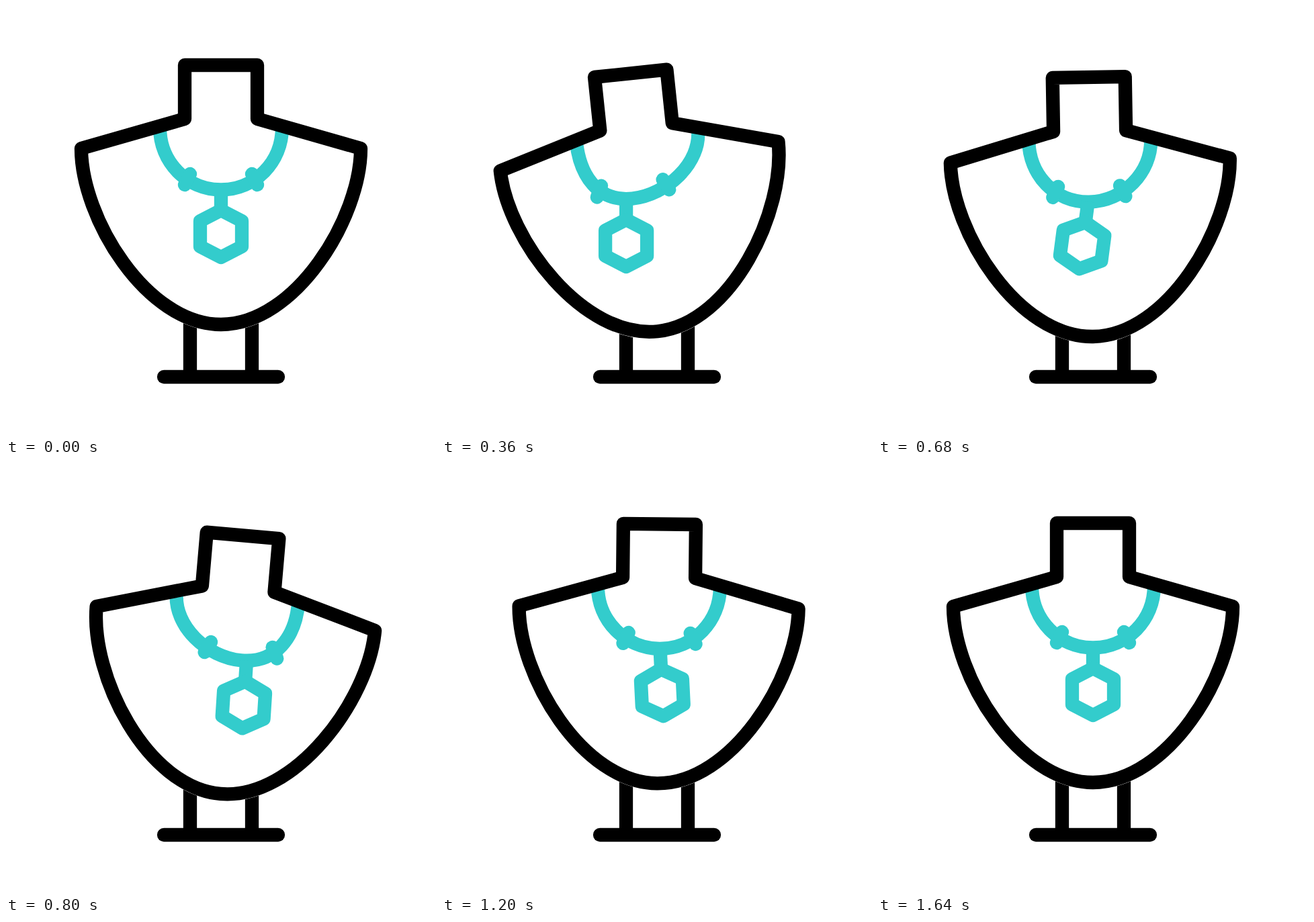
Write an HTML page that moves like this. It is 640 px wide and 640 px high and loops after 1680 ms.

```html
<!DOCTYPE html>
<html lang="en">
<head>
<meta charset="utf-8">
<title>Necklace stand</title>
<style>
  html, body { margin: 0; width: 100%; height: 100%; overflow: hidden; background: #fff; }
  svg { display: block; width: 100vw; height: 100vh; }
  svg { fill: none; stroke: #000; stroke-width: 20.3; stroke-linecap: round; stroke-linejoin: round; }
  .teal { stroke: #33cccc; }
  .butt { stroke-linecap: butt; }
  .body { fill: #fff; stroke: #fff; stroke-width: 20.8; }
</style>
</head>
<body>
<svg viewBox="0 0 640 640">
  <defs>
    <path id="shape" d="M266 88H374V168L528 212C528 315 431 474 320 474S112 315 112 212L266 168Z"/>
  </defs>
  <path class="butt" d="M274 470V552M366 470V552"/>
  <path d="M235 552H405"/>
  <g id="bust">
    <use href="#shape" class="body"/>
    <g class="teal">
      <path id="ring" class="butt"/>
      <g id="beads">
        <path id="bead" d="M274 250L266 266"/>
        <use href="#bead" transform="translate(640 0) scale(-1 1)"/>
      </g>
      <g id="pendant">
        <path class="butt" d="M320 273V304"/>
        <path d="M320 304L351 320V358L320 374L289 358V320Z"/>
      </g>
    </g>
    <use href="#shape"/>
  </g>
</svg>
<script>
  const LOOP = 1680, STEP = 40;
  const el = id => document.getElementById(id);
  const [bust, ring, beads, pendant] = ['bust', 'ring', 'beads', 'pendant'].map(el);

  // Eased rise from 0 to 1 between two times.
  function ramp(t, from, to) {
    const f = Math.min(1, Math.max(0, (t - from) / (to - from)));
    return f * f * (3 - 2 * f);
  }

  const drop = t => 18 * (ramp(t, 70, 600) - ramp(t, 715, 1300));
  const tilt = t => -7.1 * ramp(t, 104, 446) + 12.3 * ramp(t, 536, 824) - 5.2 * ramp(t, 918, 1275);
  const swing = t => 11 * ramp(t, 130, 564) - 23.3 * ramp(t, 600, 986)
    + 16.3 * ramp(t, 1020, 1360) - 4 * ramp(t, 1360, 1640);

  function draw(now) {
    const t = Math.floor((now % LOOP) / STEP) * STEP;
    const angle = tilt(t);
    const slide = angle * 4.35;
    const x = 320 + slide * 0.65;

    bust.setAttribute('transform', `translate(0 ${drop(t)}) rotate(${angle} 320 465)`);
    ring.setAttribute('d', `M229 181C229 232 ${x - 51} 273.5 ${x} 273.5S411 232 411 181`);
    beads.setAttribute('transform', `translate(${slide * 0.57} 0)`);
    pendant.setAttribute('transform', `translate(${slide} 0) rotate(${swing(t)} 320 273)`);
  }

  const start = performance.now();
  function tick() {
    draw(performance.now() - start);
    requestAnimationFrame(tick);
  }
  tick();
</script>
</body>
</html>
```
